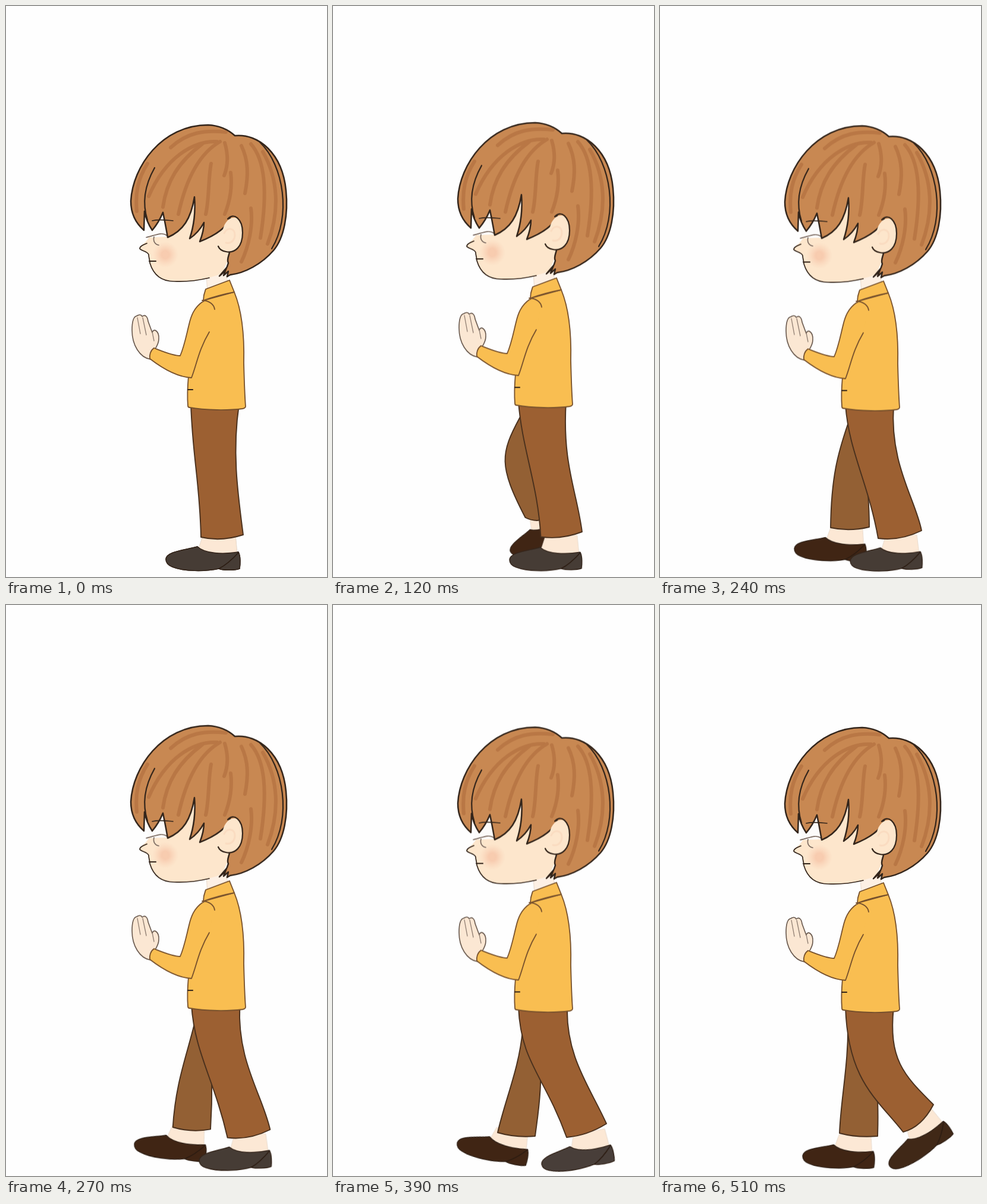
Write an HTML page without scripts that moves like this. It is 540 px wide and 960 px high and loops after 540 ms.

```html
<!DOCTYPE html>
<html lang="en">
<head>
<meta charset="utf-8">
<title>Walking boy</title>
<style>
html, body { margin: 0; width: 100%; height: 100%; overflow: hidden; background: #fefefe; }
svg { display: block; width: 100%; height: 100%; stroke-linecap: round; stroke-linejoin: round; filter: blur(.45px); }

/* Motion advances in 30 ms steps between key poses. */
.body, .leg, .shoe { animation: 540ms steps(4) infinite; }
.body { animation-name: bob; }
.leg { stroke: #49301d; stroke-width: 1.9; }
.shoe { transform-origin: 269px 930px; }
.near.leg { fill: #9c6032; animation-name: near-leg; }
.far.leg { fill: #936034; animation-name: far-leg; }
.near.shoe { fill: #463c35; animation-name: near-shoe; }
.far.shoe { fill: #402514; animation-name: far-shoe; }
.ink { fill: none; stroke: #33251b; stroke-width: 2.2; }
.thin { stroke-width: 1.7; }
.cloth { fill: #f9be51; stroke: #76502c; stroke-width: 1.8; }
.seam { fill: none; }
.hair { fill: #c88852; stroke-width: 2.5; }
.strand { fill: none; stroke: #ad6a3b; stroke-width: 6; opacity: .55; }

@keyframes bob {
  0%, 100% { transform: translateY(0); animation-timing-function: step-end; }
  11.11% { transform: translateY(-5px); }
  33.33% { transform: translateY(-2.5px); animation-timing-function: steps(2); }
  44.44% { transform: translateY(1.5px); animation-timing-function: steps(3); }
  61.11% { transform: translateY(5.5px); animation-timing-function: steps(2); }
  72.22% { transform: translateY(5.5px); }
  94.44% { transform: translateY(6px); animation-timing-function: step-end; }
}
@keyframes near-leg {
  0%, 100% { d: path("M311 670C314 760 326 800 328 893Q362 901 399 889C390 820 380 750 392 670Z"); animation-timing-function: step-end; }
  11.11% { d: path("M312 664C318 740 340 820 341 892Q377 898 412 885C402 800 386 770 392 664Z"); }
  33.33% { d: path("M312 667C318 750 350 790 358 893Q392 897 426 883C418 830 385 770 392 667Z"); animation-timing-function: steps(2); }
  44.44% { d: path("M312 671C318 750 350 800 367 895Q403 900 440 882C430 830 386 770 393 671Z"); animation-timing-function: steps(3); }
  61.11% { d: path("M312 676C316 760 350 790 384 897Q420 900 453 882C434 810 393 760 394 676Z"); animation-timing-function: steps(2); }
  72.22% { d: path("M312 676C316 770 355 790 393 895Q428 892 460 872C432 810 392 760 394 676Z"); }
  94.44% { d: path("M312 676C316 800 365 830 409 886Q440 878 460 840C410 790 384 765 393 676Z"); animation-timing-function: step-end; }
}
@keyframes far-leg {
  0%, 100% { d: path("M318 690C322 760 335 800 335 880Q360 890 388 880C384 820 378 750 380 690Z"); animation-timing-function: step-end; }
  11.11% { d: path("M315 690C278 755 274 775 340 852Q370 870 398 840C390 800 370 750 350 690Z"); }
  33.33% { d: path("M314 693C285 750 282 770 307 868Q328 876 352 864C350 800 350 760 340 693Z"); animation-timing-function: steps(2); }
  44.44% { d: path("M316 703C300 750 288 790 287 877Q318 884 352 876C352 830 348 780 340 703Z"); animation-timing-function: steps(3); }
  61.11% { d: path("M318 710C310 780 280 830 268 880Q300 894 328 892C336 860 350 800 345 715Z"); animation-timing-function: steps(2); }
  72.22% { d: path("M319 715C313 780 290 830 277 887Q308 896 340 893C344 860 354 810 348 715Z"); }
  94.44% { d: path("M316 695C318 770 304 830 302 888Q332 896 366 893C367 860 368 850 360 715Z"); animation-timing-function: step-end; }
}
@keyframes near-shoe {
  0%, 100% { transform: translate(0, 0) rotate(0deg) scale(1); animation-timing-function: step-end; }
  11.11% { transform: translate(20px, 0) rotate(0deg) scale(.98); }
  33.33% { transform: translate(36px, 2px) rotate(-1deg) scale(.97); animation-timing-function: steps(2); }
  44.44% { transform: translate(51px, 3px) rotate(-2deg) scale(.97); animation-timing-function: steps(3); }
  61.11% { transform: translate(66px, 6px) rotate(-4deg) scale(.98); fill: #493f3a; animation-timing-function: steps(2); }
  72.22% { transform: translate(82px, 10px) rotate(-10deg) scale(.98); fill: #483e39; }
  94.44% { transform: translate(117px, 13px) rotate(-34deg) scale(.96); fill: #402817; animation-timing-function: step-end; }
}
@keyframes far-shoe {
  0%, 100% { transform: translate(0, 0) rotate(0deg) scale(1); animation-timing-function: step-end; }
  11.11% { transform: translate(59px, -20px) rotate(-36deg) scale(.76); }
  33.33% { transform: translate(0, -5px) rotate(-18deg) scale(.98); animation-timing-function: steps(2); }
  44.44% { transform: translate(-43px, -18px) rotate(2deg) scale(.97); animation-timing-function: steps(3); }
  61.11% { transform: translate(-73px, -36px) rotate(15deg) scale(.98); animation-timing-function: steps(2); }
  72.22% { transform: translate(-60px, -26px) rotate(11deg) scale(.97); }
  94.44% { transform: translate(-29px, -4px) rotate(2deg) scale(.97); animation-timing-function: step-end; }
}
</style>
</head>
<body>
<svg viewBox="0 0 540 960">
  <defs>
    <radialGradient id="blush">
      <stop offset=".3" stop-color="#f6c3a6" stop-opacity=".75"/>
      <stop offset="1" stop-color="#f9cfb4" stop-opacity="0"/>
    </radialGradient>
    <g id="foot">
      <path d="M324 912L331 891L386 889L389 922L350 924Z" fill="#fce8d5" stroke="#e9dbcd"/>
      <path d="M269 930C270 917 300 915 322 909C335 921 365 922 391 918C395 925 394 940 393 946C385 949 365 949 358 946C335 951 300 951 280 943C272 940 269 935 269 930Z" stroke="#33241a" stroke-width="1.5"/>
      <path d="M358 946C370 940 381 930 391 919" fill="none" stroke="#2b1b11" stroke-width="1.6"/>
    </g>
  </defs>

  <use class="far shoe" href="#foot"/>
  <path class="far leg" d="M318 690C322 760 335 800 335 880Q360 890 388 880C384 820 378 750 380 690Z"/>
  <use class="near shoe" href="#foot"/>
  <path class="near leg" d="M311 670C314 760 326 800 328 893Q362 901 399 889C390 820 380 750 392 670Z"/>

  <g class="body">
    <!-- neck, shirt and hands -->
    <path d="M337 452L339 482L374 466L368 446Z" fill="#fdf0e4" stroke="#e8d9cc"/>
    <path class="cloth" d="M333 495L384 481C398 515 401 560 400 600C401 640 402 660 403 673Q403 676 398 677C375 680 335 680 309 675Q306 675 306 672C305 660 305 645 307 622L318 540Z"/>
    <path class="cloth" d="M332 495C332 485 335 479 336 476L376 461L384 481Q358 486 332 495Z"/>
    <path d="M212 545C212 530 214 522 220 521C224 518 228 519 229 522C234 518 238 522 239 530L246 549C248 541 258 546 257 560C257 572 248 577 243 594C225 591 212 570 212 545Z" fill="#fbe7d3" stroke="#66564b" stroke-width="1.6"/>
    <path d="M221 524L226 551M230 524L236 553M246 548L249 563" fill="none" stroke="#8d7c70" stroke-width="1.3"/>
    <path d="M331 497C316 507 311 522 308 535C303 555 300 572 293 588C280 588 262 580 249 575C243 579 241 587 242 593C268 613 292 624 312 625C321 602 324 578 342 548L350 506Z" fill="#f9be51"/>
    <path class="cloth seam" d="M331 497C316 507 311 522 308 535C303 555 300 572 293 588C280 588 262 580 249 575C243 579 241 587 242 593C268 613 292 624 312 625C321 602 324 578 342 548M330 495C342 495 350 502 351 510"/>
    <path class="ink" d="M306 645H314"/>

    <!-- face -->
    <path d="M240 350L241 388C236 398 226 402 225 408C228 412 238 412 240 417C240 423 243 427 242 432C248 452 262 463 283 463C310 465 345 458 364 449L385 400L380 330Z" fill="#fde6cc"/>
    <path d="M234 350H270L273 388L239 389Z" fill="#fcfbfa"/>
    <path d="M235 358L253 362L246 379Z" fill="#c8c3b9"/>
    <path class="ink thin" d="M237 399C230 402 225 404 225 408C228 412 238 412 240 418C240 423 242 427 242 432C248 452 262 463 283 463C303 464 325 461 342 457"/>
    <circle cx="268" cy="418" r="22" fill="url(#blush)"/>
    <path d="M236 389C250 386 262 379 271 386M249 388C247 396 251 401 257 402" fill="none" stroke="#7b6a60" stroke-width="1.7"/>
    <path class="ink" d="M241 429H252"/>

    <!-- hair -->
    <path class="ink hair" d="M232 377C217 364 210 348 210 328C213 270 262 200 340 200C360 201 375 209 385 218C425 214 465 248 471 310C475 350 468 390 450 411C430 434 402 449 377 452L372 455L374 446L366 453L371 440L359 454Q371 445 374 432C370 425 378 415 376 410L377 356C372 372 352 386 326 396Q333 378 333 364Q324 381 309 391Q320 358 317 321C311 358 298 378 272 389Q268 366 264 347Q257 364 246 377Q236 362 233 345Z"/>
    <g class="strand">
      <path d="M370 212C335 208 305 212 277 238"/>
      <path d="M355 228C315 226 268 255 240 320"/>
      <path d="M330 232C290 262 270 295 264 338"/>
      <path d="M360 228C325 248 303 290 290 350"/>
      <path d="M345 265C340 290 342 325 336 350"/>
      <path d="M368 230C374 250 373 270 367 285"/>
      <path d="M378 280C381 305 376 330 368 350"/>
      <path d="M396 235C408 260 408 285 402 315"/>
      <path d="M412 232C437 260 440 315 428 390"/>
      <path d="M432 245C458 290 461 345 440 400"/>
      <path d="M238 265C222 290 217 315 220 345"/>
      <path d="M412 340C416 370 408 405 396 430"/>
    </g>
    <path class="ink" d="M238 360C229 332 233 302 250 272M427 229C468 268 480 355 447 408"/>

    <!-- ear -->
    <path d="M366 372C373 351 398 347 398 381C398 405 385 416 370 413C364 412 359 409 357 404Z" fill="#fde6cc"/>
    <path class="ink" d="M373 358C383 346 398 358 398 381C398 405 385 416 370 413C364 412 359 409 357 404"/>
    <path d="M367 382C372 371 386 373 385 386C384 396 376 400 370 398" fill="none" stroke="#fadcc1" stroke-width="3"/>
    <!-- brow -->
    <path class="ink thin" d="M246 361C258 358 270 360 281 361"/>
  </g>
</svg>
</body>
</html>
```
